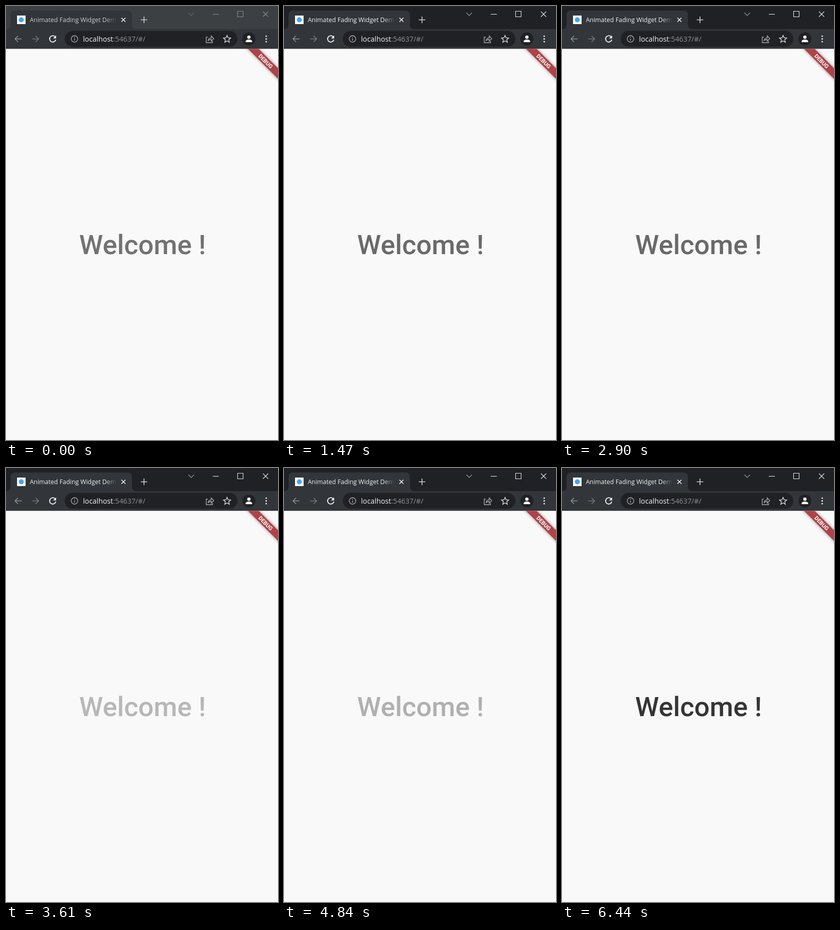
Animation, 542 px wide and 864 px high, one loop 6500 ms. Source, as an HTML page:

```html
<!DOCTYPE html>
<html lang="en">
<head>
<meta charset="utf-8">
<title>Animated Fading Widget Demo</title>
<style>
  html, body { margin: 0; width: 100%; height: 100%; overflow: hidden; background: #f9f9f9; }
  svg { display: block; width: 542px; height: 864px; }
  .ui { font-family: "Open Sans", "Noto Sans", sans-serif; }
  .roboto { font-family: Roboto, Arial, sans-serif; }
  .line { fill: none; stroke-width: 1.6; }

  .welcome {
    font-size: 54px; font-weight: 500; text-anchor: middle;
    animation: fade 6500ms linear infinite;
  }
  .bar { fill: #202124; animation: bar 6500ms linear infinite; }
  .controls { animation: controls 6500ms linear infinite; }
  .title { animation: title 6500ms linear infinite; }

  /* Opening pose held for 100 ms, then a 2 s linear fade each way */
  @keyframes fade {
    0%, 1.538% { opacity: .54; }
    1.539% { opacity: .04; }
    2.923% { opacity: 0; }
    33.692% { opacity: .9; }
    64.462% { opacity: 0; }
    95.231% { opacity: .9; }
    100% { opacity: .76; }
  }
  /* The window gains focus at 100 ms */
  @keyframes bar {
    0%, 1.538% { fill: #3c4043; }
    1.539%, 100% { fill: #202124; }
  }
  @keyframes controls {
    0%, 1.538% { opacity: .45; }
    1.539%, 100% { opacity: 1; }
  }
  @keyframes title {
    0%, 1.538% { opacity: .8; }
    1.539%, 100% { opacity: 1; }
  }
</style>
</head>
<body>
<svg viewBox="0 0 542 864" xmlns="http://www.w3.org/2000/svg">
  <defs>
    <linearGradient id="edge" gradientUnits="userSpaceOnUse" x1="198" x2="221" y1="0" y2="0">
      <stop stop-color="#f1f3f4"/>
      <stop offset="1" stop-color="#f1f3f4" stop-opacity="0"/>
    </linearGradient>
    <clipPath id="page"><path d="M0 85.5H542V864H0z"/></clipPath>
    <filter id="soft" x="-50%" y="-50%" width="200%" height="200%"><feGaussianBlur stdDeviation="3"/></filter>
  </defs>

  <!-- Title bar -->
  <rect class="bar" width="542" height="46"/>
  <path d="M0 46Q9 46 9 37V18Q9 9 18 9H242Q251 9 251 18V37Q251 46 260 46H542V85.5H0z" fill="#323539"/>
  <rect x="22" y="19" width="17" height="17" fill="#fff"/>
  <circle cx="30.5" cy="27.5" r="5" fill="#42a5f5"/>
  <text class="ui title" x="47.5" y="32" font-size="12.4" fill="url(#edge)">Animated Fading Widget Dem</text>
  <g class="line" stroke="#f1f3f4">
    <path d="M230 23.5l8 8m0-8l-8 8"/>
    <path d="M268.5 27.5h13m-6.5-6.5v13" stroke="#cdd0d3"/>
  </g>
  <g class="line controls" stroke="#e8eaed" style="stroke-width:1.1">
    <path d="M363.5 13.5l5.5 5.5 5.5-5.5" stroke="#a0a4a8"/>
    <path d="M412 16.5h12"/>
    <path d="M461.5 10.5h11v11h-11z"/>
    <path d="M512 11l10.5 10.5m0-10.5L512 21.5"/>
  </g>

  <!-- Toolbar -->
  <rect x="117" y="49.5" width="344" height="31.5" rx="15.75" fill="#202124"/>
  <g class="line">
    <path d="M31 65.5H18m6-6l-6 6 6 6" stroke="#8e9296"/>
    <path d="M52 65.5h13m-6-6l6 6-6 6" stroke="#75797d"/>
    <path d="M98.3 61.7a6.3 6.3 0 1 0 1 5.3" stroke="#f1f3f4" stroke-width="1.9"/>
    <path d="M99.8 58.5v6h-6z" fill="#f1f3f4"/>
    <g stroke="#a5a9ad" stroke-width="1.4">
      <circle cx="136.5" cy="65.5" r="6.5"/>
      <path d="M136.5 64.5v4.5m0-7.5v1.5"/>
      <path d="M402 62h-3v11h12.5v-3"/>
      <path d="M402.5 69.5c.5-4 3-6 6.5-6v-4l5 5.5-5 5v-3.5c-3 0-5 .8-6.5 3z"/>
    </g>
    <path d="M440.5 58.5l2 4.7 5.2.5-3.9 3.4 1.2 5.1-4.5-2.7-4.5 2.7 1.2-5.1-3.9-3.4 5.2-.5z" stroke="#d8dadd" stroke-width="1.4"/>
  </g>
  <text class="ui" x="153.5" y="70.5" font-size="14.3" fill="#f1f3f4">localhost<tspan fill="#8e9296">:54637/#/</tspan></text>
  <circle cx="484" cy="65.5" r="13" fill="#202124"/>
  <g fill="#fff">
    <circle cx="484" cy="62" r="3.3"/>
    <path d="M477.5 72v-1.5c0-2.6 3.5-3.8 6.5-3.8s6.5 1.2 6.5 3.8V72z"/>
  </g>
  <g fill="#e8eaed">
    <circle cx="518.5" cy="60" r="1.6"/>
    <circle cx="518.5" cy="65.5" r="1.6"/>
    <circle cx="518.5" cy="71" r="1.6"/>
  </g>

  <!-- Page -->
  <rect y="85.5" width="542" height="778.5" fill="#f9f9f9"/>
  <g clip-path="url(#page)">
    <path d="M472 75L493 75 552 134V155z" opacity=".45" filter="url(#soft)"/>
    <path d="M472 75L493 75 552 134V155z" fill="#b04348"/>
    <text class="roboto" transform="translate(517.3 110) rotate(45)" y="3.9" font-size="11" font-weight="700" text-anchor="middle" fill="#fff">DEBUG</text>
  </g>
  <text class="roboto welcome" x="272" y="494">Welcome !</text>
</svg>
</body>
</html>
```
